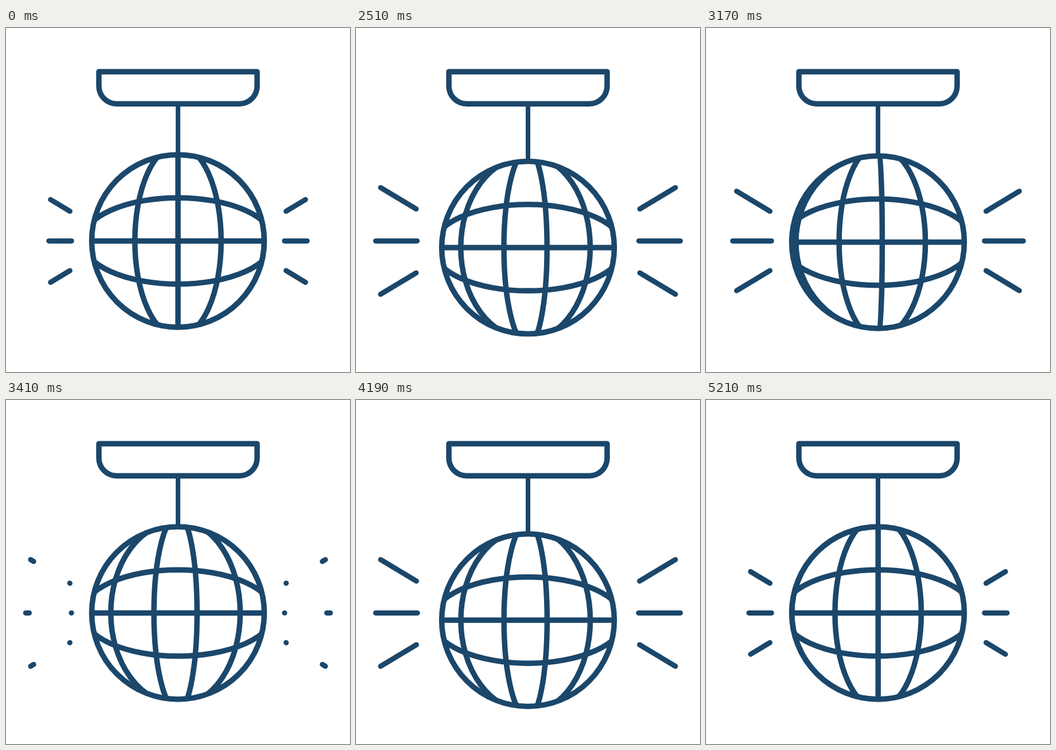
An HTML page with a canvas for the animation above (5240 ms loop, 600x600 px).

```html
<!DOCTYPE html>
<html>
<head>
<meta charset="utf-8">
<title>Mirror ball</title>
<style>
  html, body { margin: 0; width: 100%; height: 100%; overflow: hidden; background: #fff; }
  canvas { display: block; }
</style>
</head>
<body>
<canvas id="stage" width="600" height="600"></canvas>
<script>
const ctx = document.getElementById('stage').getContext('2d');
const LOOP = 5240, START = 2030, STEP = 30;
const R = 150.5, GRID = R / 2;                // ball radius, meridian spacing
const RAY = 80, DASH = 76.5, PERIOD = 150;    // ray length, dash, dash plus gap
const WIDTH = 9.5;

// Keys are [time, value]
const drop = [[1990, 0], [2690, 14], [3340, -0.3], [4040, 14], [4580, 4.3], [5000, 0]];
const spin = [[1970, 0], [2930, 101.25], [3410, 192.5], [3860, 286], [4580, 397], [LOOP, 6 * GRID]];
const flow = [[1960, 0], [2930, 112.5], [3410, 260.8], [3860, 399.5], [4580, 570.5], [LOOP, 4 * PERIOD]];

// Monotone cubic through the keys, at rest at both ends
function ease(keys, t) {
  const last = keys.length - 1;
  if (t <= keys[0][0]) return keys[0][1];
  if (t >= keys[last][0]) return keys[last][1];
  const slope = i => (keys[i + 1][1] - keys[i][1]) / (keys[i + 1][0] - keys[i][0]);
  const tangent = i => {
    if (i === 0 || i === last) return 0;
    const a = slope(i - 1), b = slope(i);
    return a * b > 0 ? 2 * a * b / (a + b) : 0;
  };
  const i = keys.findIndex(k => k[0] > t) - 1;
  const [t0, v0] = keys[i], [t1, v1] = keys[i + 1];
  const w = t1 - t0, u = (t - t0) / w, n = 1 - u;
  return v0 + (v1 - v0) * u * u * (3 - 2 * u)
    + w * (tangent(i) * u * n * n - tangent(i + 1) * u * u * n);
}

function line(x1, y1, x2, y2) {
  ctx.beginPath();
  ctx.moveTo(x1, y1);
  ctx.lineTo(x2, y2);
  ctx.stroke();
}

function ellipse(rx, ry, from = 0, to = 2 * Math.PI) {
  ctx.beginPath();
  ctx.ellipse(0, 0, rx, ry, 0, from, to);
  ctx.stroke();
}

// Long half axis of a grid curve at distance d from the centre
const reach = d => R + 21.5 * (1 - (d / R) ** 2);

function drawMount(ballY) {
  ctx.beginPath();
  ctx.moveTo(162, 76.3);
  ctx.lineTo(438, 76.3);
  ctx.arcTo(438, 132.3, 300, 132.3, 31);
  ctx.arcTo(162, 132.3, 162, 76.3, 31);
  ctx.closePath();
  ctx.stroke();
  ctx.lineWidth = 8;
  line(300, 132, 300, ballY - R);
  ctx.lineWidth = WIDTH;
}

function drawBall(y, turn) {
  ctx.save();
  ctx.translate(300, y);
  ctx.save();
  ctx.beginPath();
  ctx.arc(0, 0, R, 0, 2 * Math.PI);
  ctx.clip();
  line(-R, 0, R, 0);
  ellipse(reach(GRID), GRID);
  for (let k = -1; k <= 2; k++) {
    const d = k * GRID - turn % GRID, a = Math.abs(d);
    if (a < 0.5) line(d, -R, d, R);
    else {
      const from = d > 0 ? -Math.PI / 2 : Math.PI / 2;
      ellipse(a, reach(a), from, from + Math.PI);
    }
  }
  ctx.restore();
  ellipse(R, R);
  ctx.restore();
}

function drawRays(shift) {
  const head = (39.5 + shift) % PERIOD;
  ctx.lineWidth = 9;
  for (const side of [-1, 1]) for (const row of [-1, 0, 1]) {
    const x = 300 + side * (row ? 188.5 : 185.7), y = 371.4 + row * 51.8;
    const dx = side * (row ? 0.857 : 1), dy = row * 0.515;
    for (const h of [head, head + PERIOD]) {
      const a = Math.max(0, h - DASH), b = Math.min(RAY, h);
      if (b >= a) line(x + dx * a, y + dy * a, x + dx * (b + 0.01), y + dy * (b + 0.01));
    }
  }
}

function draw() {
  let t = performance.now() % LOOP;
  t = t < START ? 0 : START + Math.floor((t - START) / STEP) * STEP;
  ctx.fillStyle = '#fff';
  ctx.fillRect(0, 0, 600, 600);
  ctx.strokeStyle = '#1b476b';
  ctx.lineWidth = WIDTH;
  ctx.lineCap = ctx.lineJoin = 'round';
  const y = 371.4 + ease(drop, t);
  drawMount(y);
  drawBall(y, ease(spin, t));
  drawRays(ease(flow, t));
  requestAnimationFrame(draw);
}
draw();
</script>
</body>
</html>
```
